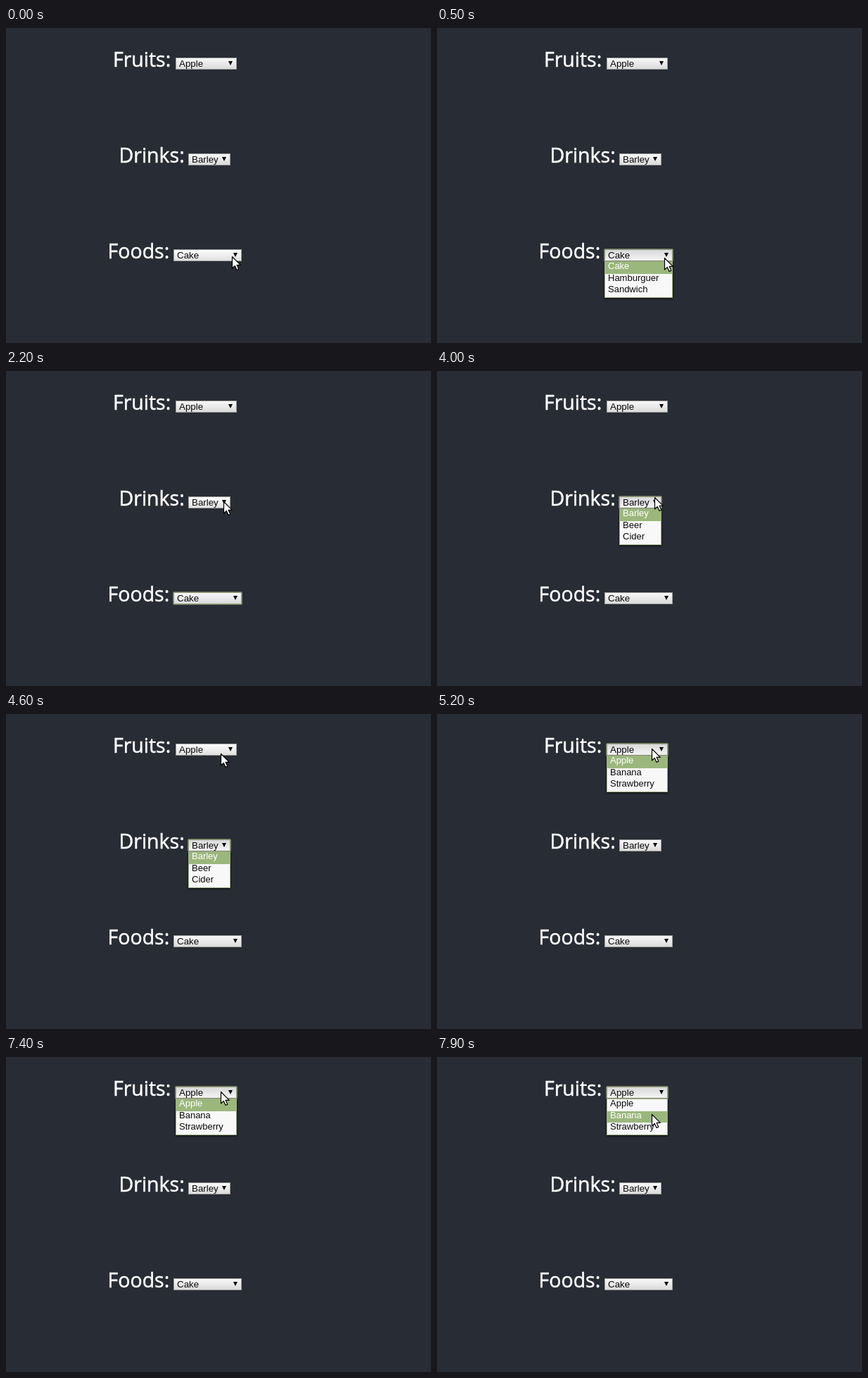
An HTML page for the animation above (8 s loop, 604 by 447 pixels).

```html
<!DOCTYPE html>
<html lang="en">
<head>
<meta charset="utf-8">
<title>Select menus</title>
<style>
  html, body { margin: 0; width: 100%; height: 100%; overflow: hidden; background: #282c34; }
  svg { display: block; width: 604px; height: 447px; }
  text { font: 13px "Liberation Sans", Arial, sans-serif; fill: #0a0a0a; }
  .label { font: 28.5px "Open Sans", "Noto Sans", sans-serif; fill: #fff; stroke: #fff; stroke-width: .5px; }
  .value { font-size: 13.333px; }
  .popup { filter: drop-shadow(0 1px 1.5px rgba(0, 0, 0, .75)); }
</style>
</head>
<body>
<svg id="stage" viewBox="0 0 604 447">
  <defs>
    <linearGradient id="normal" x2="0" y2="1"><stop stop-color="#f9f9f9"/><stop offset="1" stop-color="#dadada"/></linearGradient>
    <linearGradient id="hover" x2="0" y2="1"><stop stop-color="#fefefe"/><stop offset="1" stop-color="#dfdfdf"/></linearGradient>
    <linearGradient id="pressed" x2="0" y2="1"><stop stop-color="#d8d8d8"/><stop offset="1" stop-color="#f5f5f5"/></linearGradient>
  </defs>
</svg>
<script>
const LOOP = 8000;
const FRAME = 100;
const RELEASE = 200;
const stage = document.getElementById('stage');

function add(parent, tag, attrs, text) {
  const node = document.createElementNS('http://www.w3.org/2000/svg', tag);
  for (const key in attrs) node.setAttribute(key, attrs[key]);
  if (text) node.textContent = text;
  return parent.appendChild(node);
}

function makeMenu(label, labelX, x, y, width, options) {
  const right = x + width;
  const rowTop = i => y + Math.round(18.4 + 16.5 * i);

  add(stage, 'text', { class: 'label', x: labelX, y: y + 13 }, label);
  const ring = add(stage, 'rect', {
    x: x - .5, y: y - .5, width: width + 1, height: 18, rx: 1.5, fill: 'none', stroke: '#70795f'
  });
  const face = add(stage, 'rect', { x: x + .5, y: y + .5, width: width - 1, height: 16 });
  add(stage, 'text', { class: 'value', x: x + 5, y: y + 13 }, options[0]);
  add(stage, 'path', { d: `M${right - 12} ${y + 5}h6l-3 6z`, fill: '#000' });

  const popup = add(stage, 'g', { class: 'popup' });
  add(popup, 'rect', { x: x + .5, y: y + 17.5, width: width - 1, height: 51, fill: '#f8f8f9', stroke: '#a0b085' });
  const bar = add(popup, 'rect', { x: x + 1, width: width - 2, fill: '#9bb77c' });
  const items = options.map((text, i) => add(popup, 'text', { x: x + 5, y: rowTop(i) + 10 }, text));

  return ({ focus, open, pressed }, [px, py]) => {
    const over = px >= x && px < right && py >= y && py < y + 17;
    const look = pressed ? 'pressed' : over ? 'hover' : 'normal';
    const pointed = options.findIndex((_, i) => py >= rowTop(i) && py < rowTop(i + 1));
    const row = Math.max(0, pointed);

    ring.style.display = focus ? '' : 'none';
    popup.style.display = open ? '' : 'none';
    face.setAttribute('fill', `url(#${look})`);
    face.setAttribute('stroke', focus ? '#929c7d' : '#999');
    bar.setAttribute('y', rowTop(row));
    bar.setAttribute('height', rowTop(row + 1) - rowTop(row));
    items.forEach((item, i) => { item.style.fill = i === row ? '#fff' : ''; });
  };
}

const fruits = makeMenu('Fruits:', 152, 241, 42, 87, ['Apple', 'Banana', 'Strawberry']);
const drinks = makeMenu('Drinks:', 160.5, 259, 178, 60, ['Barley', 'Beer', 'Cider']);
const foods = makeMenu('Foods:', 144.5, 238, 314, 97, ['Cake', 'Hamburguer', 'Sandwich']);

const pointer = add(stage, 'path', {
  d: 'M.5 .5V17l3.8-3.6 2.8 6 2.7-1.2-2.7-5.9h5.2z',
  fill: '#fff', stroke: '#000', 'stroke-width': 1.2, 'stroke-linejoin': 'round'
});

const visits = [
  { menu: foods, open: 300, close: 2000 },
  { menu: drinks, open: 2800, close: 4700 },
  { menu: fruits, open: 5200, close: 6700 },
  { menu: fruits, open: 7400, close: LOOP }
];

const home = [321, 324];
const moves = [
  { start: 0, end: 100, to: [321, 328] },
  { start: 300, end: 500, to: [323, 326] },
  { start: 1100, end: 1500, to: [317, 212] },
  { start: 1500, end: 1700, to: [308, 180] },
  { start: 1900, end: 2200, to: [309, 185] },
  { start: 3900, end: 4000, to: [309, 179] },
  { start: 4000, end: 4700, to: [305, 49] },
  { start: 7600, end: 7900, to: [305, 81] }
];

const smooth = u => u * u * (3 - 2 * u);

function pointerAt(time) {
  return moves.reduce((from, { start, end, to }) => {
    const u = Math.min(1, Math.max(0, (time - start) / (end - start)));
    return from.map((v, i) => Math.round(v + (to[i] - v) * smooth(u)));
  }, home);
}

function render(now) {
  const time = Math.floor(now % LOOP / FRAME) * FRAME;
  const cursor = pointerAt(time);
  const visit = visits.findLast(v => v.open <= time);
  for (const menu of [fruits, drinks, foods]) {
    const focus = visit?.menu === menu;
    menu({
      focus,
      open: focus && time < visit.close,
      pressed: focus && time < visit.close + RELEASE
    }, cursor);
  }
  pointer.setAttribute('transform', `translate(${cursor})`);
}

const begin = performance.now();
function tick() {
  render(performance.now() - begin);
  requestAnimationFrame(tick);
}
tick();
</script>
</body>
</html>
```
